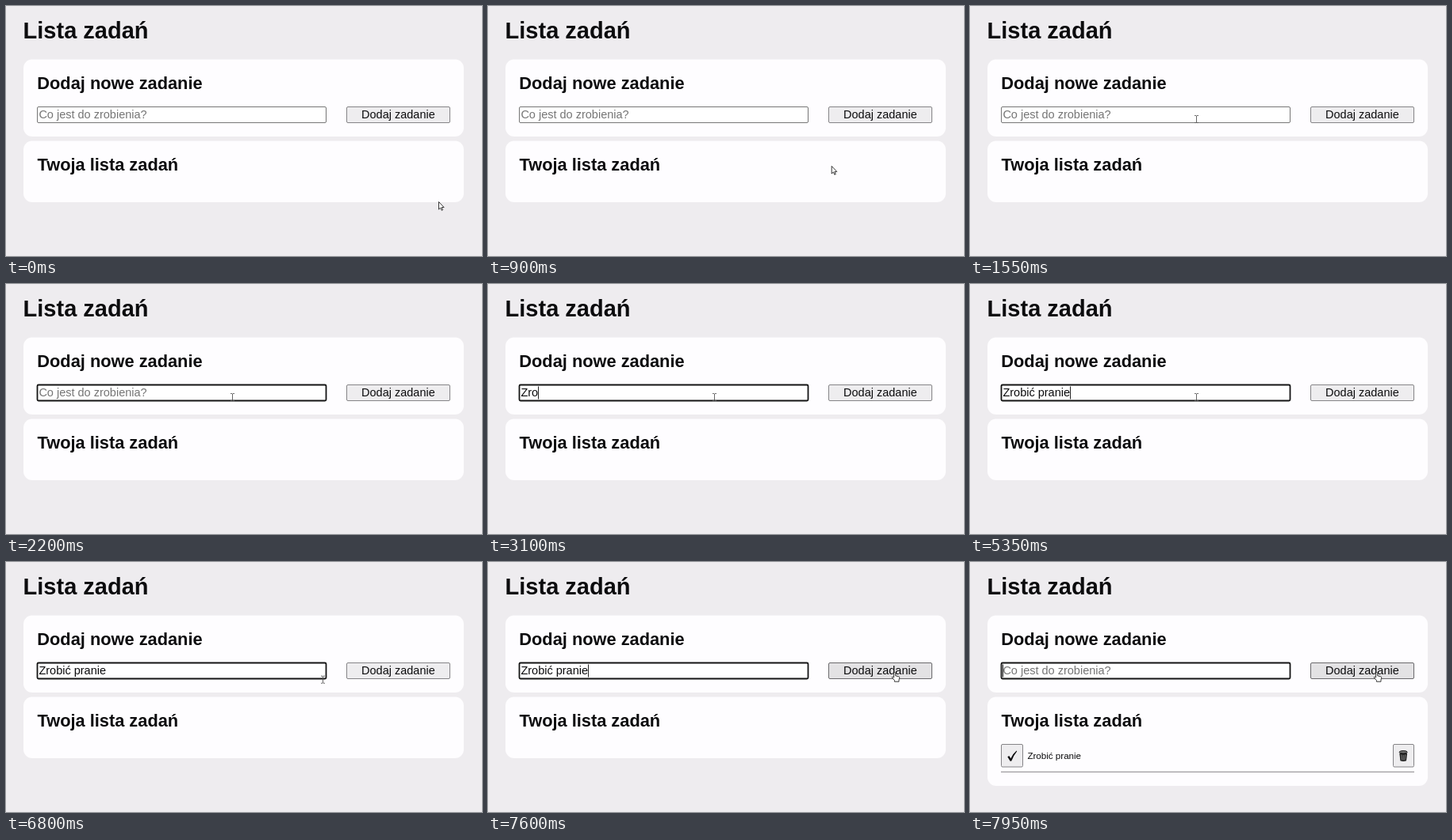
Recreate the animation shown at these times as an HTML page. Size 600 by 316 pixels, loop 8000 ms.

```html
<!DOCTYPE html>
<html lang="pl">
<head>
<meta charset="utf-8">
<title>Lista zadań</title>
<style>
  html, body { margin: 0; width: 100%; height: 100%; overflow: hidden; background: #eeecef; }
  svg { display: block; width: 600px; height: 316px; }
  text { font: 14.5px "Liberation Sans", Arial, sans-serif; fill: #0c0c0e; white-space: pre; }
  .h1 { font-size: 29px; font-weight: bold; }
  .h2 { font-size: 21.8px; font-weight: bold; }
  .small { font-size: 11.6px; }
  .card { fill: #fefdff; }
  .button { fill: #eeedef; stroke: #858487; }
  .cursor { fill: #fff; stroke: #222; stroke-width: .9; stroke-linejoin: round; }
</style>
</head>
<body>
<svg viewBox="0 0 600 316">
  <text class="h1" x="21.6" y="41">Lista zadań</text>

  <rect class="card" x="22" y="67.5" width="555" height="97.5" rx="11"/>
  <text class="h2" x="39.3" y="104.5">Dodaj nowe zadanie</text>
  <rect id="field" x="39.5" y="127.5" width="364" height="20" rx="1.5" fill="#fff"/>
  <text id="entry" x="41.4" y="142.3"></text>
  <rect id="caret" y="129.5" width="1" height="16" fill="#222"/>
  <rect id="add" class="button" x="429.5" y="127.5" width="130" height="20" rx="1.5"/>
  <text x="494.4" y="142.3" text-anchor="middle">Dodaj zadanie</text>

  <rect id="list" class="card" x="22" y="170.5" width="555" height="77.5" rx="11"/>
  <text class="h2" x="39.5" y="207.8">Twoja lista zadań</text>
  <g id="item">
    <rect class="button" x="39.5" y="230.5" width="27" height="28.5" rx="1.5"/>
    <path d="M47.3 246.2L49.3 245L51.4 248.2Q54.2 242 58.6 238.4L59.2 239.2Q55 244.2 52.3 251.6L50.7 251.8Z" fill="#0c0c0e"/>
    <text class="small" x="72.4" y="248.8">Zrobić pranie</text>
    <rect class="button" x="533.5" y="230.5" width="26" height="28.5" rx="1.5"/>
    <path d="M541.3 241.5L542.4 251.3Q546.2 252.7 550 251.3L551.1 241.5Z" fill="#222"/>
    <path d="M543.9 243.5L544.4 250.2M546.2 243.8V250.5M548.5 243.5L548 250.2" stroke="#aaa" stroke-width=".7"/>
    <ellipse cx="546.2" cy="240.3" rx="5" ry="1.7" fill="#777" stroke="#111"/>
    <path d="M39 265.3H560" stroke="#858487"/>
  </g>

  <g id="arrow" class="cursor"><path d="M0 0V9.6L2.2 7.5L3.6 10.8L5.1 10.2L3.7 7H6.6Z"/></g>
  <g id="beam"><path d="M-2.5 -4.5H-.7L0 -4L.7 -4.5H2.5M0 -4V4M-2.5 4.5H-.7L0 4L.7 4.5H2.5" fill="none" stroke="#555" stroke-width=".9"/></g>
  <g id="hand" class="cursor"><path d="M-1.2 .8C-1.2 -.3 .9 -.3 .9 .8V4.2L4.8 5.1Q6 5.4 5.9 6.8L5.2 9.6V11.6H-.4V10L-3.4 6.6C-3.9 5.6 -2.6 5.2 -1.2 6.4Z"/></g>
</svg>
<script>
const LOOP = 8000, STEP = 50, BLINK = 500;
const FOCUS = 1700, PRESS = 7750, RELEASE = 7850;
const TASK = 'Zrobić pranie', HINT = 'Co jest do zrobienia?';
const keyTimes = [2500, 2900, 3050, 3250, 3400, 3650, 4050, 4350, 4450, 4600, 5000, 5150, 5300];

const easeIn = p => p * p;
const easeOut = p => 1 - (1 - p) ** 2;
const easeBoth = p => p * p * (3 - 2 * p);
const moves = [
  { start: 500, end: 1380, from: [545.5, 247.5], to: [285.5, 143], ease: easeBoth },
  { start: 6450, end: 6800, from: [285.5, 143], to: [399.5, 148.7], ease: easeIn },
  { start: 6800, end: 7320, from: [399.5, 148.7], to: [512.8, 139.6], ease: easeOut }
];

const $ = id => document.getElementById(id);
const set = (id, attrs) => {
  for (const name in attrs) $(id).setAttribute(name, attrs[name]);
};
const show = (id, on) => set(id, { visibility: on ? 'visible' : 'hidden' });

const pen = document.createElement('canvas').getContext('2d');
pen.font = '14.5px "Liberation Sans", Arial, sans-serif';

function pointer(t) {
  const move = moves.filter(m => t >= m.start).pop() || moves[0];
  const p = Math.min(1, Math.max(0, (t - move.start) / (move.end - move.start)));
  return move.from.map((v, i) => v + (move.to[i] - v) * move.ease(p));
}

function drawPointer(t) {
  const [x, y] = pointer(t);
  const inRow = y > 126 && y < 149.5;
  const overField = inRow && x > 39 && x < 404;
  const overAdd = inRow && x > 429 && x < 560;
  const kind = overField ? 'beam' : overAdd ? 'hand' : 'arrow';
  for (const id of ['arrow', 'beam', 'hand']) show(id, id === kind);
  set(kind, { transform: `translate(${x.toFixed(1)} ${y.toFixed(1)})` });
  return overAdd;
}

function draw(t) {
  const added = t >= RELEASE;
  const pressed = t >= PRESS && !added;
  const focused = t >= FOCUS && !pressed;
  const typed = added ? '' : TASK.slice(0, keyTimes.filter(k => t >= k).length);

  $('entry').textContent = typed || HINT;
  $('entry').style.fill = typed ? '#0c0c0e' : '#757575';
  set('field', { stroke: focused ? '#141414' : '#767676', 'stroke-width': focused ? 1.8 : 1 });

  // The caret restarts its blink at every key.
  const lastKey = [FOCUS, ...keyTimes, RELEASE].filter(k => t >= k).pop();
  show('caret', focused && Math.floor((t - lastKey) / BLINK) % 2 === 0);
  set('caret', { x: Math.round(41 + pen.measureText(typed).width) });

  const hover = drawPointer(t);
  $('add').style.fill = pressed ? '#f5f5f5' : hover ? '#e3e2e4' : '';
  $('add').style.stroke = hover && !pressed ? '#6a696c' : '';

  show('item', added);
  set('list', { height: added ? 112.5 : 77.5 });
}

const origin = performance.now();
function tick() {
  const t = (performance.now() - origin) % LOOP;
  draw(Math.floor(t / STEP) * STEP);
  requestAnimationFrame(tick);
}
tick();
</script>
</body>
</html>
```
